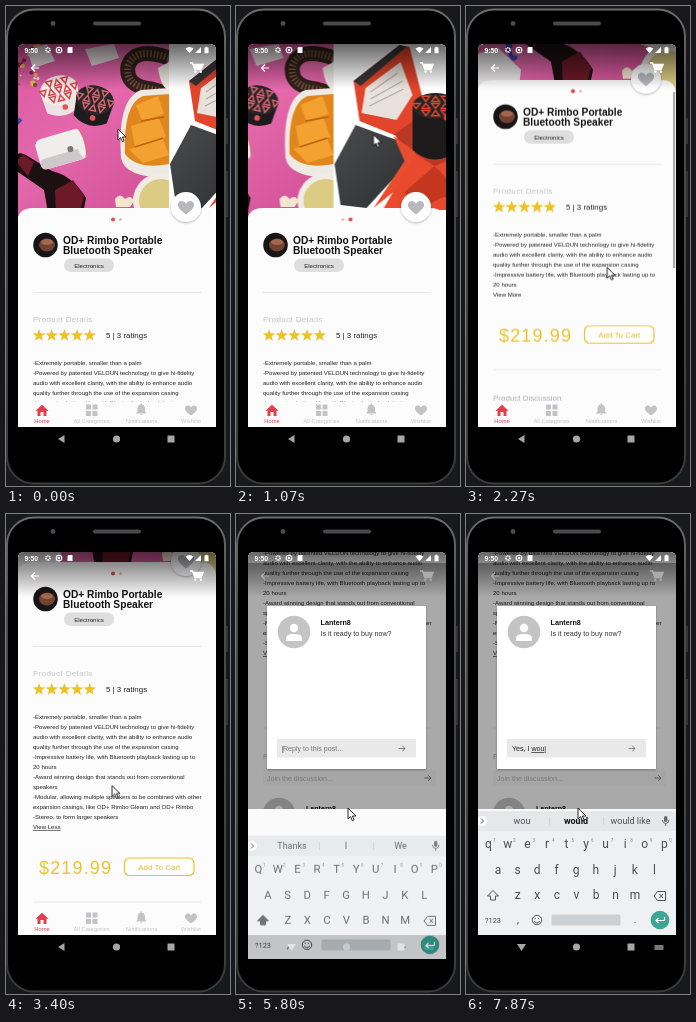
These frames come from a looping animation (224 px wide and 480 px high, 8000 ms). An HTML page:

```html
<!DOCTYPE html>
<html lang="en">
<head>
<meta charset="utf-8">
<title>Shop app walkthrough</title>
<style>
html, body { margin: 0; width: 100%; height: 100%; overflow: hidden; background: #18191b; }
svg { display: block; font-family: "Liberation Sans", Arial, sans-serif; }
#stage { width: 100vw; height: 100vh; }
svg svg { overflow: hidden; }
text { white-space: pre; }
.body { font-size: 6.05px; fill: #222; }
.bold { font-weight: 700; fill: #111; }
.mid { text-anchor: middle; }
.key { font-family: Roboto, sans-serif; fill: #4a5054; }

.anim { animation: 8s linear infinite; }
.step { animation: 8s step-end infinite; }
.slides { animation-name: slides; }
.dot { animation-name: dot; }
.page { animation-name: scroll; }
.bar { animation-name: bar; }
.less { animation-name: hideMore; }
.more { animation-name: showMore; }
.lower { animation-name: lower; }
.modal { animation-name: modal; }
.panel { animation-name: panel; }
.keys { animation-name: keys; }
.upper { animation-name: upper; }
.small { animation-name: small; }
.navBack { animation-name: navBack; }
.navDown { animation-name: navDown; }
.typing { animation-name: typing; }
.cursor { animation-name: cursor; }

@keyframes slides {
  0%, .8% { transform: translateX(-47px); animation-timing-function: ease-in-out; }
  3.3% { transform: translateX(-158px); animation-timing-function: ease-out; }
  6.3%, 11.6% { transform: translateX(-199px); animation-timing-function: ease-in-out; }
  15% { transform: translateX(-40px); animation-timing-function: ease-out; }
  18.8%, 100% { transform: none; }
}
@keyframes dot { 0% { transform: none; } 4% { transform: translateX(7.5px); } 13.8% { transform: none; } }
@keyframes scroll {
  0%, 24.4% { transform: none; animation-timing-function: ease-in; }
  28.1% { transform: translateY(-124px); animation-timing-function: ease-out; }
  31.3%, 46.5% { transform: translateY(-154px); animation-timing-function: ease-in; }
  50% { transform: translateY(-296px); animation-timing-function: ease-out; }
  54.4%, 100% { transform: translateY(-328px); }
}
@keyframes bar {
  0%, 24.4% { transform: translateY(-176px); opacity: 0; }
  25%, 28.1% { opacity: 1; }
  31.3% { transform: translateY(-93px); opacity: 1; }
  33%, 46.5% { transform: translateY(-93px); opacity: 0; }
  47% { opacity: 1; }
  50% { transform: translateY(-17px); }
  54.4%, 56% { transform: none; opacity: 1; }
  58.4%, 100% { transform: none; opacity: 0; }
}
@keyframes hideMore { 0% { visibility: visible; } 37.5%, 100% { visibility: hidden; } }
@keyframes showMore { 0% { visibility: hidden; } 37.5%, 100% { visibility: visible; } }
@keyframes lower { 0% { transform: translateY(-50px); } 37.5%, 100% { transform: none; } }
@keyframes modal { 0%, 60% { opacity: 0; } 65%, 100% { opacity: 1; } }
@keyframes panel { 0% { visibility: hidden; } 70.9%, 100% { visibility: visible; } }
@keyframes keys {
  0%, 70.9% { transform: translateY(60px); opacity: 0; }
  72.5% { transform: translateY(25px); opacity: .82; animation-timing-function: ease-out; }
  74.8%, 100% { transform: none; opacity: 1; }
}
@keyframes upper { 0% { visibility: inherit; } 80%, 100% { visibility: hidden; } }
@keyframes small { 0% { visibility: hidden; } 80%, 100% { visibility: inherit; } }
@keyframes navBack { 0% { visibility: visible; } 70.9%, 100% { visibility: hidden; } }
@keyframes navDown { 0% { visibility: hidden; } 70.9%, 100% { visibility: visible; } }
@keyframes typing {
  0% { transform: none; }
  80% { transform: translateY(-20px); }
  81.6% { transform: translateY(-40px); }
  85% { transform: translateY(-60px); }
  88.3% { transform: translateY(-80px); }
  89.1% { transform: translateY(-100px); }
  91.6% { transform: translateY(-120px); }
  94.1% { transform: translateY(-140px); }
  95.8% { transform: translateY(-160px); }
  97.3% { transform: translateY(-180px); }
  98.3%, 100% { transform: translateY(-200px); }
}
@keyframes cursor {
  0%, .8% { transform: translate(112px, 123px); }
  3.3% { transform: translate(1px, 128px); }
  5% { transform: translate(8px, 128px); }
  7.5% { transform: translate(44px, 126px); }
  10.9%, 11.6% { transform: translate(58px, 127px); }
  15% { transform: translate(209px, 130px); }
  20.8% { transform: translate(160px, 334px); }
  21.6%, 22.5% { transform: translate(160px, 339px); }
  24.4% { transform: translate(160px, 389px); }
  28.1% { transform: translate(148px, 262px); }
  32.5% { transform: translate(43px, 251px); }
  35%, 37.5% { transform: translate(43px, 260px); }
  42.5% { transform: translate(106px, 271px); }
  45.6%, 46.5% { transform: translate(107px, 405px); }
  50% { transform: translate(110px, 263px); }
  55% { transform: translate(113px, 293px); }
  58.4%, 69% { transform: translate(111px, 293px); }
  69.1%, 100% { transform: translate(112px, 294px); }
}
</style>
</head>
<body>
<svg id="stage" viewBox="0 0 224 480" preserveAspectRatio="none">
  <defs>
    <linearGradient id="shade" x2="0" y2="1">
      <stop offset="0" stop-opacity=".6"/><stop offset=".3" stop-opacity=".42"/><stop offset="1" stop-opacity="0"/>
    </linearGradient>
    <linearGradient id="pink" x2="1" y2="1">
      <stop offset="0" stop-color="#d9559c"/><stop offset=".5" stop-color="#e468ab"/><stop offset="1" stop-color="#cf4c92"/>
    </linearGradient>
    <linearGradient id="flap" x2="1" y2="1"><stop offset="0" stop-color="#4a4b4d"/><stop offset="1" stop-color="#2e2f31"/></linearGradient>
    <linearGradient id="edge" x2="0" y2="1"><stop offset="0" stop-color="#6a6b6e"/><stop offset=".2" stop-color="#4a4b4d"/><stop offset="1" stop-color="#3a3b3d"/></linearGradient>
    <filter id="soft" x="-30%" y="-30%" width="160%" height="160%"><feDropShadow dx="0" dy="1" stdDeviation="1.3" flood-opacity=".3"/></filter>
    <clipPath id="screen"><path d="M12 421V44Q12 38 18 38H204Q210 38 210 44V421Z"/></clipPath>
    <path id="heart" d="M0 6C-5 2-7.5 0-7.5-3C-7.5-7-2-8 0-4C2-8 7.5-7 7.5-3C7.5 0 5 2 0 6Z"/>
    <g id="avatar"><circle r="16.3" fill="#c4c4c4"/><circle cy="-4" r="4.2" fill="#fff"/><path d="M-8 9V6Q-8 2 0 2T8 6V9Z" fill="#fff"/></g>
    <path id="send" d="M-3.5 0H3M.3-2.7L3 0L.3 2.7" fill="none" stroke="#777" stroke-width=".9"/>
  </defs>

  <rect width="224" height="480" fill="#18191b"/>
  <path d="M219 112h3v26h-3zM219 165h3v46h-3z" fill="#333"/>
  <rect x="1" y="3.5" width="218" height="474" rx="27" fill="#000" stroke="url(#edge)" stroke-width="2"/>
  <rect x="87" y="15.5" width="48" height="4" rx="2" fill="#48494b"/>
  <circle cx="47" cy="17.5" r="2.4" fill="#4b4c50"/>

  <g clip-path="url(#screen)">
    <rect x="11" y="38" width="199" height="383" fill="#fff"/>
    <g class="anim page">
      <g class="anim slides">
        <svg x="11" y="38" width="199" height="180" viewBox="11 38 199 180">
          <rect x="11" y="38" width="199" height="180" fill="url(#pink)"/>
          <g id="confetti"></g>
          <path d="M68 44L88 38L96 55L74 62ZM126 43L155 38L160 52L133 60Z" fill="#e9dfe2"/>
          <path d="M210 52Q176 40 169 60Q166 80 192 83L210 88" fill="none" stroke="#33211b" stroke-width="15"/>
          <path d="M210 52Q176 40 169 60Q166 80 192 83L210 88" fill="none" stroke="#74543f" stroke-width="7" stroke-dasharray="1.5 2"/>
          <path d="M199 62Q202 82 210 84V56Z" fill="#efeae2"/>
          <path d="M12 92Q30 82 37 107T62 113M12 118Q35 102 43 132T62 152M12 150Q32 120 39 155T50 178M20 82L45 170" fill="none" stroke="#3b46a8" stroke-width="4"/>
          <path d="M12 137Q30 122 48 143M15 168L42 103M12 102L55 137" fill="none" stroke="#d9dcf0" stroke-width="2.5"/>
          <path d="M12 176L32 170L55 192L52 218H12Z" fill="#ece9ea"/>
          <path d="M55 153Q58 144 67 149L93 165Q114 170 127 192L122 218H91L85 184L59 166Q52 161 55 153Z" fill="#1c1012"/>
          <path d="M57 155l7-6 11 7-6 14zM96 184l18-10 11 16-5 20H97z" fill="#6d1a28"/>
          <path d="M162 152Q158 93 182 84L210 82V172Q166 172 162 152Z" fill="#eeeae3"/>
          <path d="M166 148Q164 98 184 90L210 88V158Q178 164 166 148Z" fill="#e0861d"/>
          <path d="M177 99l22-9 6 18-22 7zM172 120l28-8 7 19-31 10zM170 143l34-10 6 16-26 8z" fill="#f3a130"/>
          <path d="M182 115l23-4M176 141l28-9" stroke="#bd6410" stroke-width="1.5"/>
          <circle cx="202" cy="195" r="28" fill="#f0ece4"/><circle cx="202" cy="195" r="22" fill="#dccb83"/>
          <path d="M156 193q5-7 10 0q6-5 9 2l-4 6h-14z" fill="#f3e6cf"/>
          <g id="speakers"></g>
          <g transform="rotate(-16 101 143)">
            <rect x="78" y="128" width="48" height="31" rx="7" fill="#f0eeec"/>
            <rect x="78" y="148" width="48" height="11" rx="5" fill="#cfc8c8"/>
            <ellipse cx="123" cy="143" rx="4.5" ry="15" fill="#dc6a70"/>
            <ellipse cx="122" cy="143" rx="4" ry="15" fill="#f0eeec"/>
            <circle cx="111" cy="146" r="3" fill="#777"/>
          </g>
        </svg>
        <svg x="210" y="38" width="199" height="180" viewBox="11 38 199 180">
          <rect x="11" y="38" width="199" height="180" fill="#fff"/>
          <path d="M31 75L77 39L87 41L100 92L91 118L74 130L37 115Z" fill="#e2452b"/>
          <path d="M31 75L77 39L84 41L38 80Z" fill="#393536"/>
          <path d="M43 82L78 56L90 89L74 114L39 107Z" fill="#e9e2dc"/>
          <path d="M48 86l27-19M48 93l32-18M47 100l34-17" stroke="#b6aaa3" stroke-width="1.3"/>
          <path d="M132 98L147 59L194 66L185 110L145 124Z" fill="#e3472b"/>
          <path d="M144 89L153 68L188 72L178 102L147 112Z" fill="#462a27"/>
          <path d="M150 84l30 4M148 93l30 3" stroke="#b93b26" stroke-width="2"/>
          <path d="M134 76L146 57L194 66L184 73L151 70Z" fill="url(#flap)"/>
          <path d="M72 128L95 112L132 112L153 134L133 164L92 163Z" fill="#b93824"/>
          <path d="M12 158L33 119L82 137L87 155L44 202L18 199Z" fill="url(#flap)"/>
          <path d="M71 130L92 145L97 165L51 202L82 155Z" fill="#e84d2f"/>
          <path d="M93 148L112 160L147 146L189 204H60Z" fill="#e9492c"/>
          <path d="M112 160L147 195L121 191L92 205L82 186Z" fill="#c4371f"/>
          <path d="M146 128L200 108L210 126V181L184 171Z" fill="url(#flap)"/>
          <path d="M136 148L148 128L188 171L210 179V196L182 202Z" fill="#e04529"/>
          <path d="M153 163L205 176L210 205H184Z" fill="url(#flap)"/>
          <path d="M90 100V144Q112 163 136 144V100Z" fill="#1c1a1b"/>
          <ellipse cx="113" cy="100" rx="23" ry="13" fill="#282526"/>
          <g id="grille"></g>
          <circle cx="124" cy="112" r="2.8" fill="#d9482f"/>
        </svg>
      </g>

      <path d="M11 421V218Q11 202 27 202H194Q210 202 210 218V800H11Z" fill="#fcfcfc"/>
      <circle cx="107" cy="213.5" r="1.5" fill="#e5b9bf"/><circle cx="114.5" cy="213.5" r="1.5" fill="#e5b9bf"/>
      <circle class="step dot" cx="107" cy="213.5" r="2" fill="#e2475a"/>
      <circle cx="180" cy="201" r="15" fill="#fff" filter="url(#soft)"/>
      <use href="#heart" transform="translate(180 202) scale(1.08)" fill="#b9b9bd"/>
      <circle cx="39.5" cy="239" r="12.3" fill="#171515"/>
      <ellipse cx="41" cy="239" rx="8" ry="6.5" fill="#704333"/><ellipse cx="41" cy="236" rx="6" ry="3" fill="#a46750"/>
      <g class="bold" font-size="10.2"><text x="57" y="237.5">OD+ Rimbo Portable</text><text x="57" y="247.5">Bluetooth Speaker</text></g>
      <rect x="58" y="252.5" width="50" height="13.5" rx="6.7" fill="#dedede"/>
      <text x="83" y="261.5" class="body mid">Electronics</text>
      <path d="M27 286.5H195" stroke="#e3e3e3" stroke-width=".8"/>
      <text x="27" y="316" font-size="8" letter-spacing=".36" fill="#c5c5c5">Product Details</text>
      <g id="stars" fill="#edc223"></g>
      <text x="100" y="331.7" font-size="7.9" fill="#222">5 | 3 ratings</text>
      <g id="lines" class="body"></g>
      <text class="body step less" x="27" y="419" text-decoration="underline">View More</text>
      <g class="step lower">
        <text x="33" y="513.5" font-size="18" letter-spacing="1.15" fill="#edc22d">$219.99</text>
        <rect x="118.5" y="498" width="69.5" height="17.5" rx="5" fill="#fff" stroke="#edc22d" stroke-width="1.2"/>
        <text x="153.3" y="509.7" class="mid" font-size="8" fill="#e9bc22">Add To Cart</text>
        <path d="M27 542H195" stroke="#e6e6e6" stroke-width=".8"/>
        <text x="27" y="573" font-size="8" fill="#aaa">Product Discussion</text>
        <rect x="27" y="584" width="173" height="16" fill="#f6f6f7"/>
        <text x="31" y="594.5" font-size="7.1" fill="#b5b5b5">Join the discussion...</text>
        <use href="#send" x="192" y="592"/>
        <use href="#avatar" x="43" y="628"/>
        <text x="70" y="625" class="bold" font-size="7.1">Lantern8</text>
        <text x="70" y="636" font-size="5.85" fill="#555">Is it ready to buy now?</text>
        <path d="M27 653.5H200M27 709H200" stroke="#ddd" stroke-width=".8"/>
        <use href="#avatar" x="43" y="682"/>
        <text x="70" y="674" class="bold" font-size="7.1">MOSSY_FLAPJACKS</text>
        <g font-size="5.85" fill="#555"><text x="70" y="684.5">How many colors are these speakers available</text><text x="70" y="694.5">in?</text></g>
      </g>
    </g>
    <rect class="anim bar" x="207" y="214" width="2.2" height="176" fill="#aaa"/>

    <rect x="11" y="38" width="199" height="45" fill="url(#shade)"/>
    <g fill="none" stroke="#fff">
      <path d="M33 62H25.5M29 58.5L25.5 62L29 65.5" stroke-width="1.2"/>
      <path d="M184 57H186.5L189 63.5H195L197 58.5H187.5" stroke-width="1.5"/>
    </g>
    <path d="M187.5 58.5H197L195 63.5H189ZM188.2 65.8a1.2 1.2 0 1 0 2.4 0a1.2 1.2 0 1 0-2.4 0M193.6 65.8a1.2 1.2 0 1 0 2.4 0a1.2 1.2 0 1 0-2.4 0" fill="#fff"/>

    <rect x="11" y="395.5" width="199" height="26" fill="#fcfcfc"/>
    <g class="mid" font-size="5.8" fill="#c3c3c7">
      <path d="M36 398.7L42.5 404.7H40.5V410H37.5V406H34.5V410H31.5V404.7H29.5Z" fill="#e0404b"/>
      <text x="36" y="417" fill="#e0404b">Home</text>
      <path d="M80 398.5h5v5h-5zM86.5 398.5h5v5h-5zM80 405h5v5h-5zM86.5 405h5v5h-5z"/>
      <text x="85.5" y="417">All Categories</text>
      <path d="M130 407.5L131.5 405.5V402Q132 399 134.5 398.6V397.5H136V398.6Q138.5 399 139 402V405.5L140.5 407.5ZM134 408.3H136.7Q135.3 410.5 134 408.3Z"/>
      <text x="135.5" y="417">Notifications</text>
      <use href="#heart" transform="translate(185 404.8) scale(.8)"/>
      <text x="185" y="417">Wishlist</text>
    </g>

    <g class="anim modal">
      <rect x="11" y="49" width="199" height="372" fill="#000" opacity=".33"/>
      <rect x="31" y="92" width="159" height="163" fill="#fff" filter="url(#soft)"/>
      <use href="#avatar" x="58" y="118"/>
      <text x="84.5" y="110.5" class="bold" font-size="7.2">Lantern8</text>
      <text x="84.5" y="122" font-size="7.1" fill="#333">Is it ready to buy now?</text>
      <rect x="41" y="225" width="139" height="18.5" fill="#e9e9e9"/>
      <svg x="41" y="225" width="120" height="18" viewBox="41 225 120 18">
        <g id="reply" class="step typing" font-size="7.07" fill="#222"></g>
      </svg>
      <use href="#send" x="166" y="234.5"/>
    </g>

    <g fill="#fff">
      <text x="18.5" y="46.7" font-size="6.8" font-weight="700">9:50</text>
      <circle cx="42" cy="44" r="2.1" fill="none" stroke="#fff" stroke-width="1.6" stroke-dasharray="1.1 .55"/>
      <circle cx="53" cy="44" r="2.8" fill="none" stroke="#fff" stroke-width="1.1"/><circle cx="53" cy="44" r="1.2"/>
      <path d="M62.5 41H66.5V47H61.5V42ZM179.5 42.6Q183.5 39.4 187.5 42.6L183.5 47.3ZM195 41V47H189ZM198.5 41.5H199.6V40.7H201.4V41.5H202.5V47.3H198.5Z"/>
    </g>
  </g>

  <g fill="#a6a6a6">
    <path class="step navBack" d="M52 433L58.5 429V437Z"/>
    <path class="step navDown" d="M51 430H60L55.5 437Z"/>
    <circle cx="110.5" cy="433" r="3.6"/>
    <rect x="161.5" y="429.5" width="7" height="7"/>
    <path class="step navDown" d="M188.5 431H197.5V436H188.5Z" fill="#777"/>
  </g>

  <svg x="12" y="295" width="198" height="150" viewBox="12 295 198 150">
    <g class="step panel">
      <rect x="11" y="295" width="199" height="126" fill="#fafafa"/>
      <g class="anim keys">
        <rect x="11" y="297" width="199" height="124" fill="#eef0f2"/>
        <rect x="11" y="297" width="199" height="20" fill="#e5e8ea"/>
        <circle cx="16" cy="307" r="5" fill="#fff"/>
        <path d="M15 304.5L17.5 307L15 309.5" fill="none" stroke="#555"/>
        <path d="M83.5 303V311M137.5 303V311" stroke="#c9cdd0" stroke-width=".7"/>
        <svg x="24" y="299" width="168" height="18" viewBox="24 299 168 18">
          <g id="hints" class="step typing key mid" font-size="9"></g>
        </svg>
        <g fill="#666">
          <rect x="198" y="302" width="3.4" height="6" rx="1.7"/>
          <path d="M196.5 306Q196.5 309.5 199.7 309.5T203 306M199.7 309.5V312" fill="none" stroke="#666" stroke-width=".9"/>
        </g>
        <g id="upper" class="step upper key mid"></g>
        <g id="lowerKeys" class="step small key mid"></g>
        <path d="M188 382L191.5 377.5H199.5V386.5H191.5ZM193.5 380L197 384M197 380L193.5 384" fill="none" stroke="#555"/>
        <text x="27" y="409" class="key mid" font-size="7.5">?123</text>
        <text x="52" y="409" class="key mid" font-size="10">,</text>
        <text x="169" y="409" class="key mid" font-size="10">.</text>
        <g fill="none" stroke="#555"><circle cx="71" cy="406" r="4.7"/><path d="M68.3 407Q71 411 73.7 407M69.3 404V405M72.7 404V405"/></g>
        <rect x="85.5" y="400.5" width="69" height="11" rx="1.5" fill="#cdd1d4"/>
        <circle cx="194" cy="406" r="9.3" fill="#3ba596"/>
        <path d="M198.5 403V406.5H190M192.5 404L190 406.5L192.5 409" fill="none" stroke="#fff" stroke-width="1.2"/>
      </g>
    </g>
  </svg>

  <g class="anim cursor"><path d="M0 0V11L2.6 8.6L4.3 12.6L6.1 11.8L4.4 8H8Z" fill="#fff" stroke="#111" stroke-width=".9"/></g>
</svg>
<script>
const put = (id, markup) => document.getElementById(id).innerHTML = markup;
const times = (n, fn) => Array.from({ length: n }, (_, i) => fn(i)).join("");

const details = [
  "-Extremely portable, smaller than a palm",
  "-Powered by patented VELDUN technology to give hi-fidelity",
  "audio with excellent clarity, with the ability to enhance audio",
  "quality further through the use of the expansion casing",
  "-Impressive battery life, with Bluetooth playback lasting up to",
  "20 hours",
  "-Award winning design that stands out from conventional",
  "speakers",
  "-Modular, allowing multiple speakers to be combined with other",
  "expansion casings, like OD+ Rimbo Gleam and OD+ Rimbo",
  "-Stereo, to form larger speakers",
  "<tspan text-decoration='underline'>View Less</tspan>"
];
put("lines", details.map((line, i) =>
  `<text x="27" y="${358.7 + i * 10.05}" class="${i > 5 ? "step more" : ""}">${line}</text>`).join(""));

const star = times(10, i => {
  const r = i % 2 ? 2.7 : 6.6, a = i * Math.PI / 5;
  return `${r * Math.sin(a)},${-r * Math.cos(a)} `;
});
put("stars", times(5, i => `<polygon points="${star}" transform="translate(${33 + i * 12.7} 329.5)"/>`));

// Seeded noise for the party litter
let seed = 7;
const rand = () => (seed = seed * 16807 % 2147483647) / 2147483647;
const litter = ["#e7bd4b", "#f4e8d7", "#8c234f", "#6b4a55"];
put("confetti", times(70, i =>
  `<circle cx="${12 + rand() * 70}" cy="${38 + rand() * 45}" r="${.8 + rand() * 1.8}" fill="${litter[i % 4]}"/>`));

// Triangular lattice inside an ellipse of the given radii
const lattice = (rx, ry, color) => times(3, row => times(5, col => {
  const x = (col - 2) * rx * .42, y = (row - 1) * ry * .55;
  if ((x / rx) ** 2 + (y / ry) ** 2 > .8) return "";
  const w = rx * .17, h = ry * .2, flip = (row + col) % 2 ? -1 : 1;
  return `<path d="M${x - w} ${y + h * flip}H${x + w}L${x} ${y - h * flip}Z" fill="none" stroke="${color}" stroke-width="1.5"/>`;
}));
const speaker = (x, y, angle, shell, top, mesh) =>
  `<g transform="translate(${x} ${y}) rotate(${angle})">
    <path d="M-19-1L-17 20Q0 32 17 20L19-1Z" fill="${shell}"/>
    <ellipse rx="19" ry="14.5" fill="${top}"/>${lattice(19, 14.5, mesh)}
    <circle cx="2" cy="18" r="2.8" fill="#e0545a"/></g>`;
put("speakers", speaker(100, 84, -14, "#ebe4e2", "#f6ece8", "#d8454f") + speaker(136, 94, 14, "#1d1b1c", "#2a2627", "#d0636f"));
put("grille", `<g transform="translate(113 100)">${lattice(23, 13, "#d9482f")}</g>`);

// [typed, word being composed, suggestions]
const states = [
  ["", "", "Thanks|I|We"],
  ["", "Y", "Y|You|Yes"],
  ["", "Ye", "Ye|Yes|Yeah"],
  ["", "Yes", "Yes|Yes I|Yeah"],
  ["Yes,", "", "I|we|but"],
  ["Yes, ", "", "I|it|we"],
  ["Yes, ", "I", "I|I'm|I'll"],
  ["Yes, I ", "", "would|will|am"],
  ["Yes, I ", "w", "w|will|would"],
  ["Yes, I ", "wo", "wo|would|won't"],
  ["Yes, I ", "wou", "wou|would|would like"]
];
put("reply", states.map(([done, word], i) => {
  const y = 237 + i * 20;
  const hint = i ? "" : `<tspan x="47" fill="#777">Reply to this post...</tspan>`;
  return `<text x="46" y="${y}" xml:space="preserve">${done}<tspan text-decoration="underline">${word}</tspan><tspan>|</tspan>${hint}</text>`;
}).join(""));
put("hints", states.map(([, word, list], i) => list.split("|").map((hint, k) => {
  const strong = word && k === 1;
  return `<text x="${[56, 110, 164.5][k]}" y="${310 + i * 20}" ${strong ? 'font-weight="700" fill="#111"' : ""}>${hint}</text>`;
}).join("")).join(""));

const rows = [["qwertyuiop", 22.3, 334], ["asdfghjkl", 32, 360], ["zxcvbnm", 51.8, 385]];
const letters = caps => rows.map(([row, x, y], r) => [...row].map((ch, i) => {
  const cx = x + i * 19.55;
  const digit = r ? "" : `<text x="${cx + 6.3}" y="${y - 6}" font-size="4.5" fill="#888">${(i + 1) % 10}</text>`;
  return `<text x="${cx}" y="${y}" font-size="${caps ? 11.3 : 12}">${caps ? ch.toUpperCase() : ch}</text>${digit}`;
}).join("")).join("") +
  `<path d="M27 376.5L32.5 382H29.5V386H24.5V382H21.5Z" fill="${caps ? "#555" : "none"}" stroke="#555"/>`;
put("upper", letters(true));
put("lowerKeys", letters(false));
</script>
</body>
</html>
```
